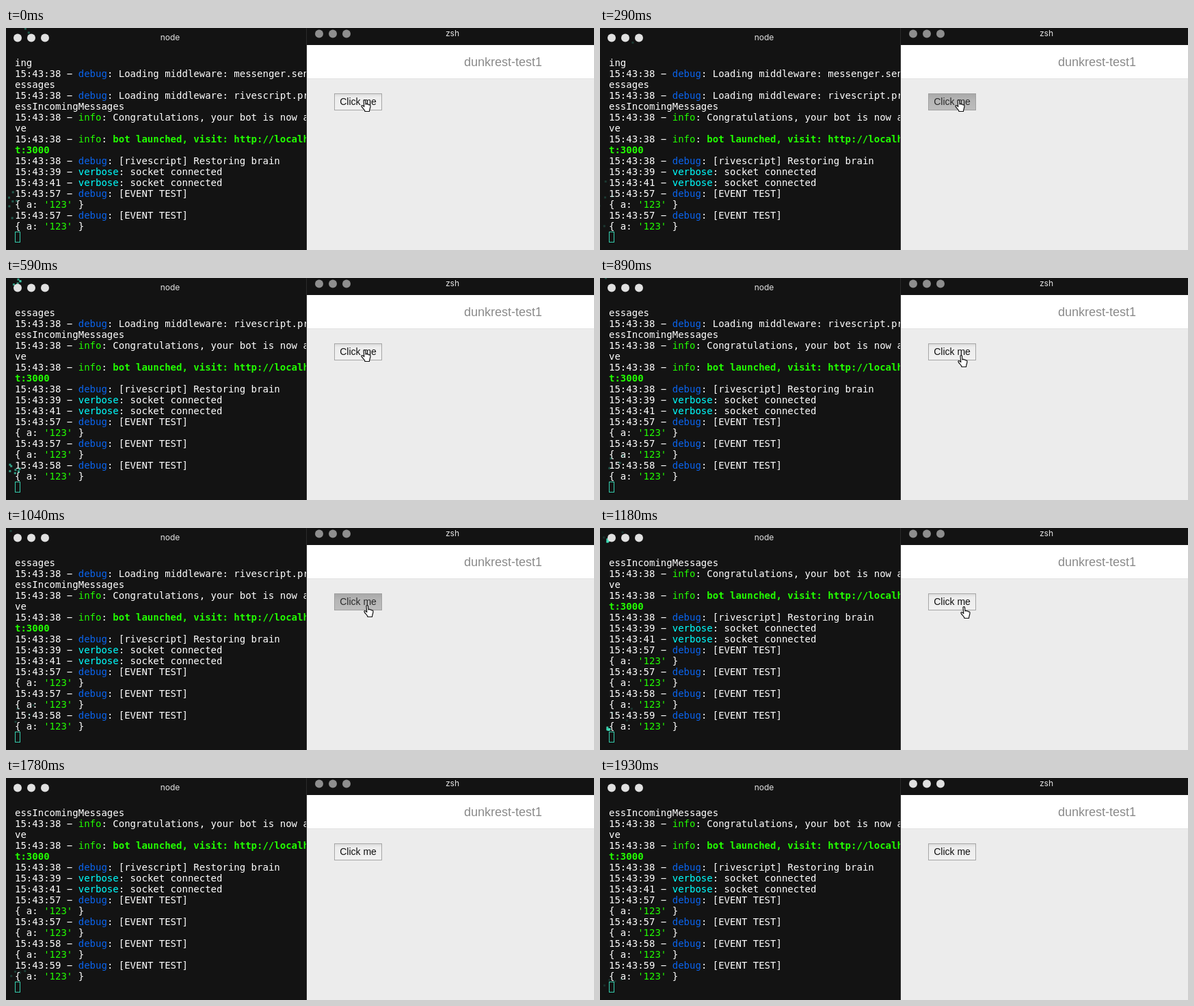
An HTML page with a canvas that plays this animation: 860 by 326 pixels, repeating every 2.03 s.

```html
<!DOCTYPE html>
<html lang="en">
<head>
<meta charset="utf-8">
<title>Terminal and event test page</title>
<style>
html, body { margin: 0; width: 100%; height: 100%; overflow: hidden; background: #131313; }
#stage { position: relative; width: 860px; height: 326px; overflow: hidden; }
#stage > * { position: absolute; box-sizing: border-box; margin: 0; }
#term { left: 0; top: 0; width: 440px; height: 326px; overflow: hidden; background: #131313; border-right: 1px solid #2b2b2b; }
#log { position: absolute; left: 13px; top: 43px; margin: 0; color: #fff; font: 14px/16px "DejaVu Sans Mono", monospace; }
#log b { color: #2f0; }
.debug { color: #0a64ee; }
.info, .str { color: #2f0; }
.verbose { color: #0ff; }
#caret { left: 13px; top: 299px; width: 8px; height: 16px; border: 1px solid #35cfae; }
.title { font: 12px/16px Inter, sans-serif; color: #e4e4e4; width: 80px; text-align: center; }
#bar { left: 440px; top: 0; width: 420px; height: 25px; background: #131313; }
#page { left: 440px; top: 25px; width: 420px; height: 301px; background: #ececec; }
#head { left: 440px; top: 25px; width: 420px; height: 50px; background: #fff; border-bottom: 1px solid #e2e2e2;
  font: 18px/50px "Liberation Sans", Arial, sans-serif; color: #8a8a8a; padding-left: 230px; }
#button { left: 480px; top: 96px; width: 70px; height: 25px; border: 1px solid #a6a6a6;
  font: 14px/23px "Liberation Sans", Arial, sans-serif; color: #111; text-align: center; white-space: nowrap;
  background: linear-gradient(#dcdcdc, #ededed 20%, #f1f1f1); }
#button.down { background: linear-gradient(#a9a9a9, #b6b6b6 40%, #bcbcbc); border-color: #a0a0a0; color: #2a2a2a; }
svg, canvas { left: 0; top: 0; }
</style>
</head>
<body>
<div id="stage">
  <div id="term"><pre id="log"></pre></div>
  <div id="caret"></div>
  <div class="title" style="left:200px;top:6px">node</div>
  <div id="bar"></div>
  <div class="title" style="left:613px;top:0">zsh</div>
  <div id="page"></div>
  <div id="head">dunkrest-test1</div>
  <div id="button">Click me</div>
  <canvas id="sparks" width="440" height="326"></canvas>
  <svg width="860" height="326">
    <g id="left" fill="#e0e0e0"></g>
    <g id="right"></g>
    <path id="hand" fill="#fff" stroke="#111" stroke-width="1.2" stroke-linejoin="round"
      d="M4 1.5C4 .3 6.3 .3 6.5 1.5L7 7C8 6 9.3 6.3 9.5 7.2C10.3 6.5 11.7 7 11.8 8C13 7.5 14 8.2 14 9.5C14 13 12.5 14 12.5 17.5H6C6 15.5 4 14 1.5 11C0 9 1.5 8 3 9L4.8 10.5Z"/>
    <path id="arrow" fill="#000" stroke="#fff" d="M0 0V14L3.2 11L5.5 16.5L8 15.5L5.7 10H10Z"/>
  </svg>
</div>
<script>
const LOOP = 2030, ROWS = 17, TICK = 1000 / 60;
const $ = id => document.getElementById(id);
const ctx = $('sparks').getContext('2d');

// The picture advances in 14 steps, aligned to hundredths of a second
const stepStart = k => 10 * Math.floor(k * 14.84 + .2);

const entry = (sec, level, text) => `15:43:${sec} − <span class="${level}">${level}</span>: ${text}`;
const event = sec => [entry(sec, 'debug', '[EVENT TEST]'), `{ a: <span class="str">'123'</span> }`];
const lines = [
  'ing',
  entry(38, 'debug', 'Loading middleware: messenger.sendM'),
  'essages',
  entry(38, 'debug', 'Loading middleware: rivescript.proc'),
  'essIncomingMessages',
  entry(38, 'info', 'Congratulations, your bot is now ali'),
  've',
  entry(38, 'info', '<b>bot launched, visit: http://localhos</b>'),
  '<b>t:3000</b>',
  entry(38, 'debug', '[rivescript] Restoring brain'),
  entry(39, 'verbose', 'socket connected'),
  entry(41, 'verbose', 'socket connected'),
  ...[57, 57, 58, 59].flatMap(event)
];

const random = seed => {
  const x = Math.sin(seed * 12.9898) * 43758.5453;
  return x - Math.floor(x);
};

// Every printed event throws fading sparks from the caret and from the top left
function drawSparks(t) {
  ctx.clearRect(0, 0, 440, 326);
  ctx.fillStyle = '#41dcb8';
  let seed = 1;
  for (const start of [-400, 435, 1140])
    for (const y of [24, 300])
      for (let i = 0; i < 7; i++) {
        const vx = random(seed++) * 2 - 1, vy = -1.5 - 2 * random(seed++);
        const n = (t - start) / TICK, alpha = .96 ** n;
        if (n < 0 || alpha < .1) continue;
        ctx.globalAlpha = alpha;
        ctx.fillRect(11.5 + vx * n, y - 1.5 + vy * n + .0375 * n * n, 3, 3);
      }
}

function place(id, pos) {
  $(id).style.display = pos ? '' : 'none';
  if (pos) $(id).setAttribute('transform', `translate(${pos})`);
}

const handPath = [[519, 105], [523, 113], [527, 115]];
const arrowPath = [[742, 304], [798, 296], [808, 310]];

function draw(k) {
  const printing = k === 3;
  const events = (k >= 4) + (k >= 8);
  $('log').innerHTML = lines.slice(2 * events, 2 * events + ROWS - !printing).join('\n');
  $('caret').style.display = printing ? 'none' : '';
  $('button').className = k === 2 || k === 7 ? 'down' : '';
  $('right').setAttribute('fill', k === 13 ? '#e0e0e0' : '#8e8e8e');
  place('hand', k < 9 && handPath[(k >= 5) + (k >= 8)]);
  place('arrow', arrowPath[k - 9]);
  drawSparks(stepStart(k));
}

let shown = -1;
function frame(now) {
  let k = 0;
  while (stepStart(k + 1) <= now % LOOP && k < 13) k++;
  if (k !== shown) draw(shown = k);
  requestAnimationFrame(frame);
}

const lights = (id, x, y) => {
  $(id).innerHTML = [0, 20, 40].map(dx => `<circle cx="${x + dx}" cy="${y}" r="6"/>`).join('');
};
lights('left', 17, 14.5);
lights('right', 458, 8.5);
frame(performance.now());
</script>
</body>
</html>
```
